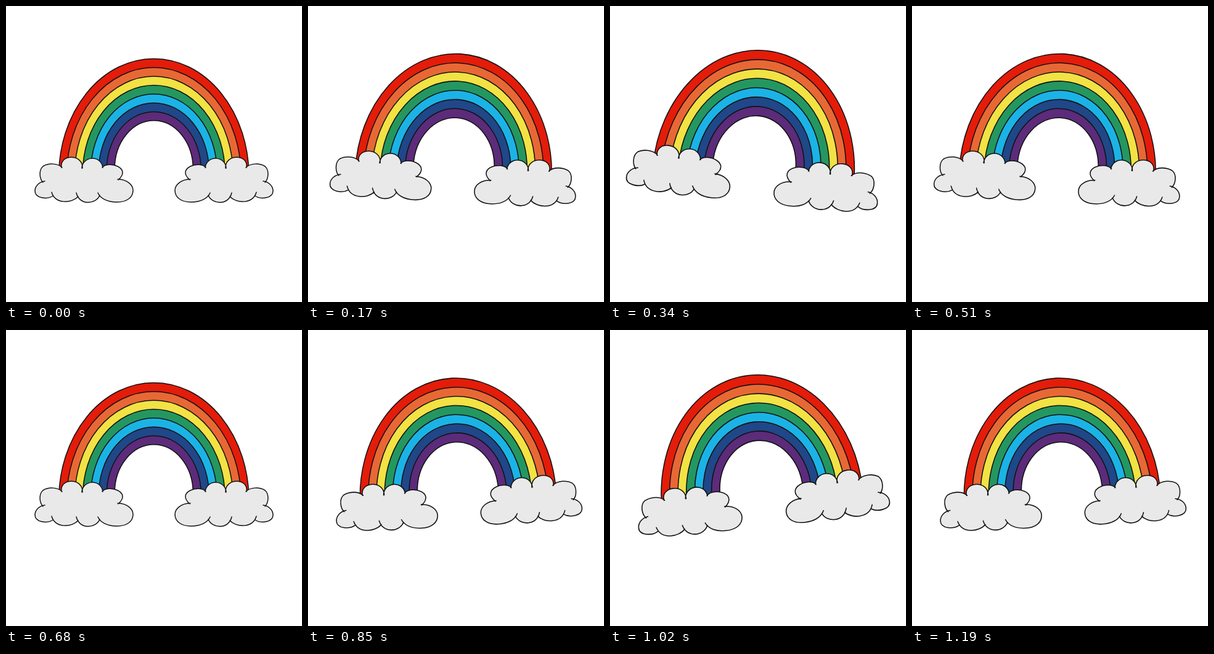
Recreate the animation shown at these times as an HTML page with a canvas. Size 480 by 480 pixels, loop 1360 ms.

```html
<!DOCTYPE html>
<html lang="en">
<head>
<meta charset="utf-8">
<title>Rocking rainbow</title>
<style>
  html, body { margin: 0; width: 100%; height: 100%; overflow: hidden; background: #fff; }
  canvas { display: block; }
</style>
</head>
<body>
<canvas id="stage" width="480" height="480"></canvas>
<script>
const ctx = document.getElementById('stage').getContext('2d');
const SIZE = 480;
const STEP = 170;
const INK = '#111';
const BANDS = ['#e41c0a', '#e86835', '#f2e244', '#249761', '#1bb3e6', '#204788', '#5c2b7a'];

// Each puff of the left cloud is its own stroke; the fill joins them.
const PUFFS = [
  '60 286 C54 280 53 266 60 260 C68 255 83 254 91 262',
  '90 262 C86 240 125 239 124 263',
  '123 263 C124 243 154 241 157 262',
  '156 262 C165 250 205 262 182 282',
  '181 281 C196 281 206 290 206 299 C206 311 195 318 180 318 C164 318 153 312 149 303',
  '152 307 C146 322 119 324 114 303',
  '117 309 C107 320 80 322 74 302',
  '76 308 C67 314 47 312 47 300 C47 291 55 285 63 284'
];
const cloudFill = new Path2D('M' + PUFFS.join(' L') + ' Z');
const cloudLines = new Path2D('M' + PUFFS.join(' M'));

// Where the base centre (240, 300) lands, plus turn in radians and scale.
const degrees = n => n * Math.PI / 180;
const REST = { x: 240, y: 300, turn: 0, scale: 1 };
const LEFT = { x: 234.75, y: 299, turn: degrees(3), scale: 1.033 };
const FAR_LEFT = { x: 230.1, y: 298.7, turn: degrees(6), scale: 1.06 };
const mirror = (pose, drop) => ({ x: SIZE - pose.x, y: pose.y + drop, turn: -pose.turn, scale: pose.scale });
const RIGHT = mirror(LEFT, 0.5);
const FAR_RIGHT = mirror(FAR_LEFT, 1);
const POSES = [REST, LEFT, FAR_LEFT, LEFT, REST, RIGHT, FAR_RIGHT, RIGHT];

// Band edge i, counted from the outside in.
function arch(i) {
  const cy = 276 - 1.7 * i;
  const path = new Path2D();
  path.ellipse(239.75, cy, 154.2 - 12.95 * i, cy - 85.4 - 14.35 * i, 0, 0, 2 * Math.PI);
  return path;
}

function drawRainbow() {
  ctx.save();
  ctx.beginPath();
  ctx.rect(0, 0, SIZE, 270);
  ctx.clip();
  BANDS.forEach((color, i) => {
    const ring = arch(i);
    ring.addPath(arch(i + 1));
    ctx.fillStyle = color;
    ctx.fill(ring, 'evenodd');
  });
  for (let i = 0; i <= BANDS.length; i++) ctx.stroke(arch(i));
  ctx.restore();
}

function drawCloud(flipped) {
  ctx.save();
  if (flipped) {
    ctx.translate(SIZE, 0);
    ctx.scale(-1, 1);
  }
  ctx.fillStyle = '#e9e9e9';
  ctx.fill(cloudFill);
  ctx.stroke(cloudLines);
  ctx.restore();
}

function draw(time) {
  const pose = POSES[Math.floor(time / STEP) % POSES.length];
  ctx.fillStyle = '#fff';
  ctx.fillRect(0, 0, SIZE, SIZE);
  ctx.save();
  ctx.translate(pose.x, pose.y);
  ctx.rotate(pose.turn);
  ctx.scale(pose.scale, pose.scale);
  ctx.translate(-REST.x, -REST.y);
  ctx.strokeStyle = INK;
  ctx.lineWidth = 1.5;
  ctx.lineCap = ctx.lineJoin = 'round';
  drawRainbow();
  drawCloud(false);
  drawCloud(true);
  ctx.restore();
}

let start;
function tick(now) {
  start ??= now;
  draw(now - start);
  requestAnimationFrame(tick);
}
draw(0);
requestAnimationFrame(tick);
</script>
</body>
</html>
```
